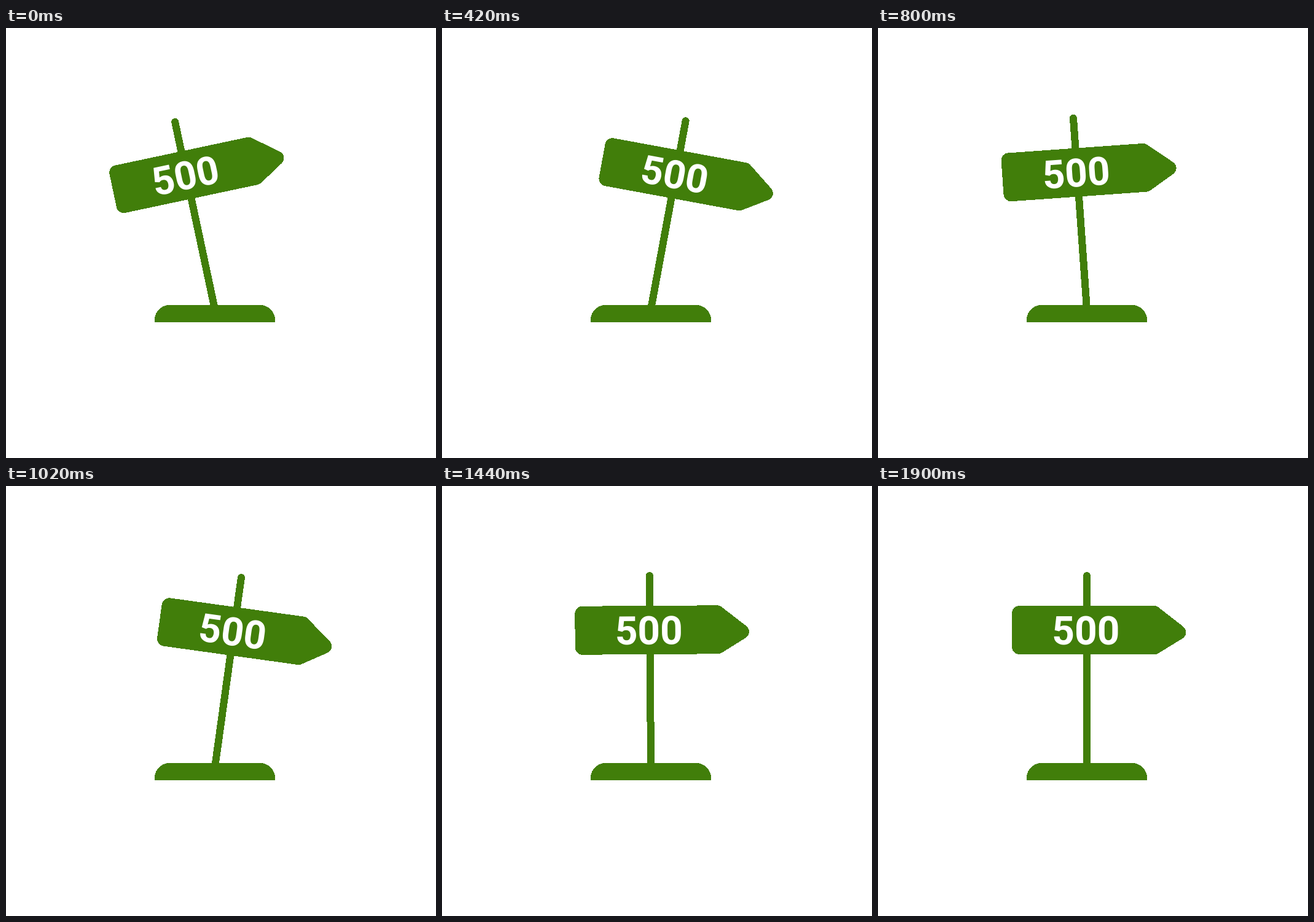
An HTML page for the animation above (2.12 s loop, 700 by 700 pixels).

```html
<!DOCTYPE html>
<html lang="en">
<head>
<meta charset="utf-8">
<title>Swinging signpost</title>
<style>
  html, body { margin: 0; width: 100%; height: 100%; overflow: hidden; background: #fff; }
  svg { display: block; width: 100%; height: 100%; }
  path { shape-rendering: crispEdges; }
  text { font: bold 64px Roboto, sans-serif; fill: #fff; text-anchor: middle; }
</style>
</head>
<body>
<svg viewBox="0 0 700 700" fill="#417e0a">
  <path d="M242 477V475A24 24 0 0 1 266 451H414A24 24 0 0 1 438 475V479H244Q242 479 242 477Z"/>
  <g id="sign">
    <path d="M334 460V146a6 6 0 0 1 12 0V460Z"/>
    <path d="M230 195H450Q453.500 195 456 197L497 229Q501.500 233 501.500 238Q501.500 244 496 248L457 272Q454 274 450 274H230A12 12 0 0 1 218 262V207A12 12 0 0 1 230 195Z"/>
    <text x="338.300" y="257.500">500</text>
  </g>
</svg>
<script>
const LOOP = 2120;
const sign = document.getElementById('sign');

// [time in ms, angle in degrees] at each turning point
const swings = [[0, -12], [360, 12], [700, -8], [1005, 8], [1300, -4], [1600, 4], [1900, 0]];

const easeSine = p => (1 - Math.cos(Math.PI * p)) / 2;

function angleAt(t) {
  if (t < 40) return swings[0][1];
  const i = swings.findIndex(([time]) => t < time);
  if (i < 0) return 0;
  const [t0, a0] = swings[i - 1], [t1, a1] = swings[i];
  return a0 + (a1 - a0) * easeSine((t - t0) / (t1 - t0));
}

const start = performance.now();

function draw() {
  const t = (performance.now() - start) % LOOP;
  sign.setAttribute('transform', `rotate(${angleAt(t)} 340 458)`);
  requestAnimationFrame(draw);
}
draw();
</script>
</body>
</html>
```
